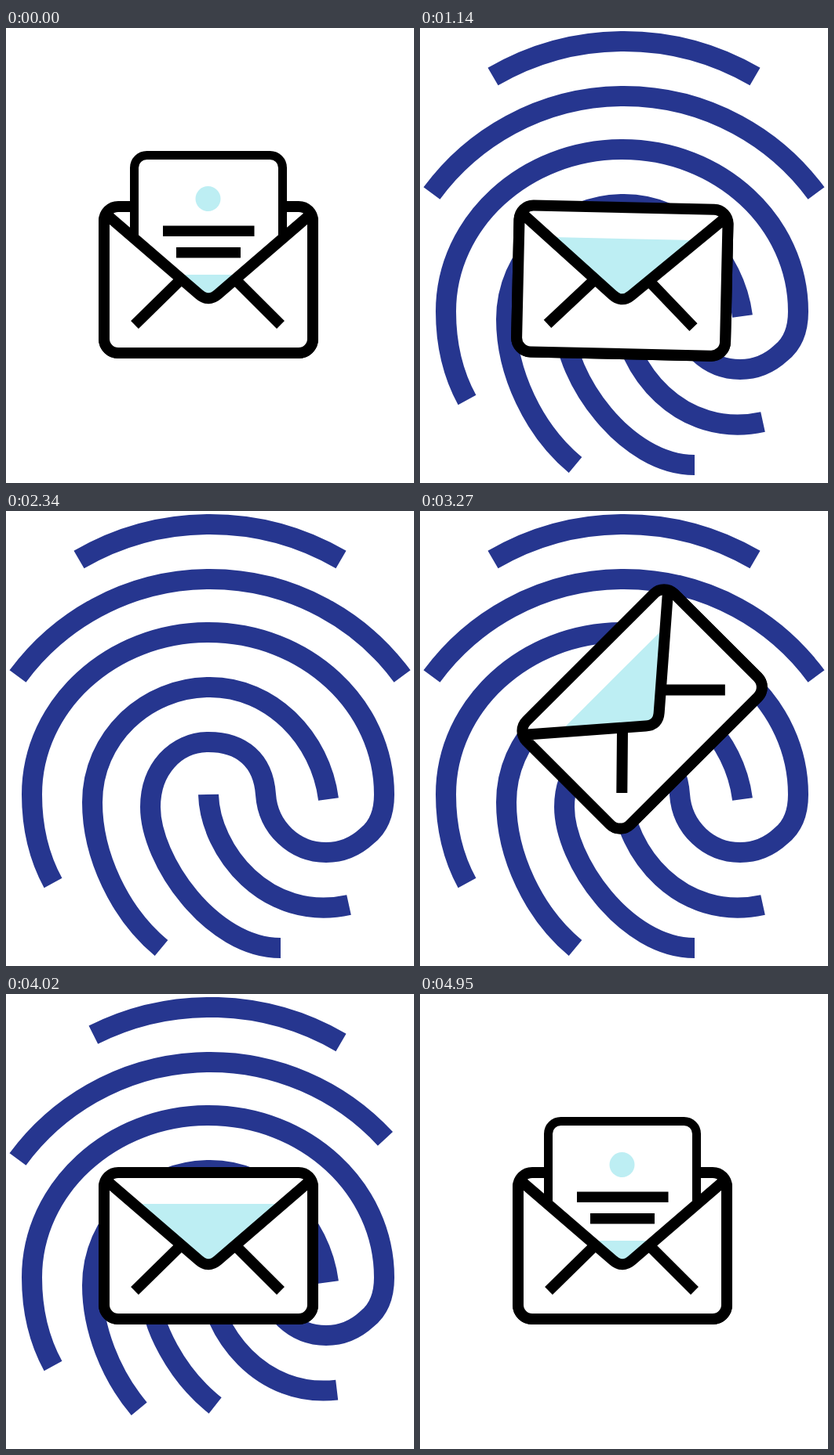
An HTML page that plays this animation: 520 by 581 pixels, repeating every 6720 ms.

```html
<!DOCTYPE html>
<html lang="en">
<head>
<meta charset="utf-8">
<title>Fingerprint mail</title>
<style>
  html, body { margin: 0; width: 100%; height: 100%; overflow: hidden; background: #fff; }
  svg { display: block; }
  #print { fill: none; stroke: #26368f; stroke-width: 26; }
  #mail { fill: #fff; stroke: #000; stroke-width: 14; stroke-linejoin: round; }
  #letter { stroke-width: 11; }
  .tint { fill: #bdeef3; stroke: none; }
  .ink { fill: #000; stroke: none; }
</style>
</head>
<body>
<svg width="520" height="581" viewBox="0 0 520 581">
  <g id="print">
    <path pathLength="1" d="M427 62A332 332 0 0 0 93 62"/>
    <path pathLength="1" d="M15 211A304 304 0 0 1 505 211"/>
    <path pathLength="1" d="M60 475C42 442 33 402 33 362C33 248 134 155 258 155S482 248 482 362C482 388 474 404 460 415C446 428 430 436 408 436C368 436 334 405 331 362C328 318 300 295 258 295S184 330 184 378C184 446 262 558 350 558"/>
    <path pathLength="1" d="M411 368C401 290 338 225 260 225C178 225 110 290 110 372C110 440 145 514 198 558"/>
    <path pathLength="1" d="M258 362C260 434 332 526 437 503"/>
  </g>
  <g id="mail">
    <rect x="125" y="228" width="266" height="187" rx="18"/>
    <path class="tint" d="M168 268H348L258 352Z"/>
    <!-- the nested viewport keeps the sunk letter inside the envelope -->
    <svg width="520" height="400">
      <g id="letter">
        <path d="M163.500 315V178.500a16 16 0 0 1 16-16H336.500a16 16 0 0 1 16 16V315"/>
        <circle class="tint" cx="257.500" cy="218" r="16"/>
        <path class="ink" d="M200 252.500H316.500V266H200ZM217 280H299V293.500H217Z"/>
      </g>
    </svg>
    <path d="M129 239L246 340Q258 350.500 270 340L387 239Q391 242 391 246V397a18 18 0 0 1-18 18H143a18 18 0 0 1-18-18V246Q125 242 129 239Z"/>
    <path d="M221 323L164 379M293 322L350 379"/>
  </g>
</svg>
<script>
const LOOP = 6720, STEP = 30;
const print = document.getElementById('print');
const mail = document.getElementById('mail');
const letter = document.getElementById('letter');

const progress = (t, from, to) => Math.min(1, Math.max(0, (t - from) / (to - from)));
const backIn = (x, s = 1.70158) => x * x * ((s + 1) * x - s);
const backInOut = x => x < .5 ? backIn(2 * x, 1.3) / 2 : 1 - backIn(2 - 2 * x, 1.3) / 2;

function draw(t) {
  const drawn = t < 3770
    ? 1 - (1 - progress(t, 0, 630)) ** 3
    : 1 - progress(t, 3770, 4410) ** 3;
  print.style.visibility = drawn > 0 ? 'visible' : 'hidden';
  print.style.strokeDasharray = drawn < 1 ? `${drawn} 2` : 'none';

  const sunk = t < 4650
    ? backIn(progress(t, 720, 1020))
    : backIn(1 - progress(t, 4650, 4950));
  letter.setAttribute('transform', `translate(0 ${210 * sunk})`);

  const tilt = backInOut(progress(t, 1050, 1470)) - backInOut(progress(t, 3360, 3780));
  const shift = t < 2340
    ? 261 * backIn(progress(t, 2070, 2340), 1.38)
    : -261 * backIn(1 - progress(t, 3090, 3360), 2.2);
  mail.style.display = t >= 2340 && t < 3120 ? 'none' : '';
  mail.setAttribute('transform', `translate(${shift} ${-shift}) rotate(${-45 * tilt} 211 313)`);
}

const start = performance.now();
function tick() {
  const t = (performance.now() - start) % LOOP;
  draw(Math.floor(t / STEP) * STEP);
  requestAnimationFrame(tick);
}
tick();
</script>
</body>
</html>
```
